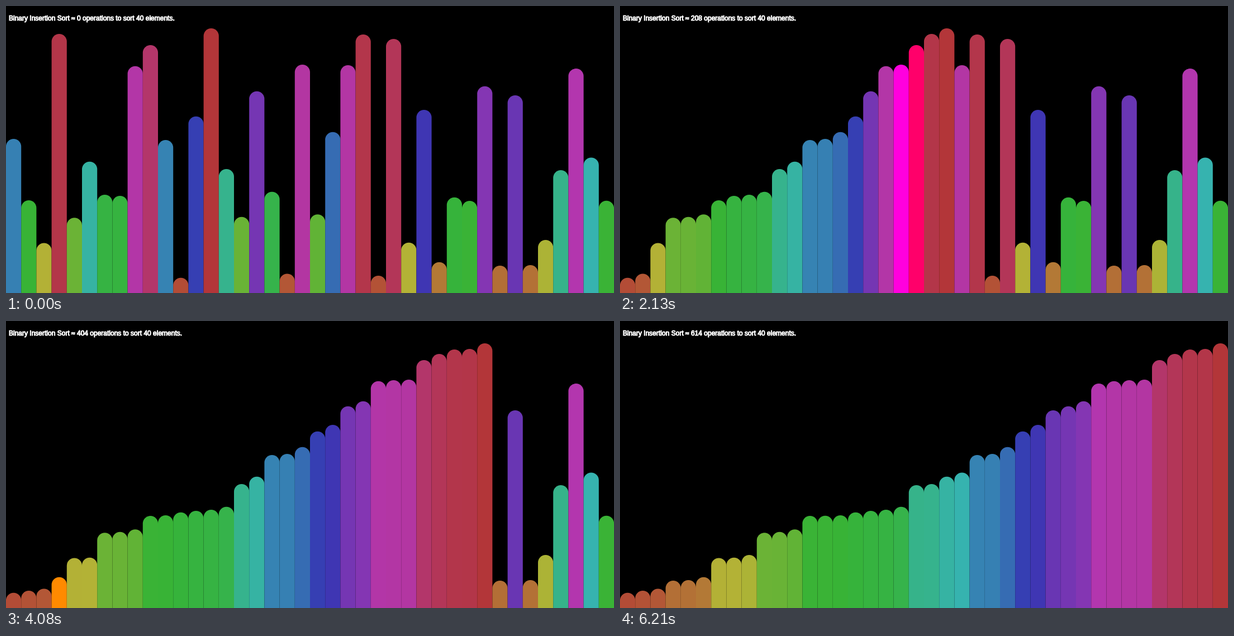
Write an HTML page that moves like this. It is 1088x514 px and loops after 9 s.

```html
<!DOCTYPE html>
<html lang="en">
<head>
<meta charset="utf-8">
<title>Binary Insertion Sort</title>
<style>
  html, body { margin: 0; width: 100%; height: 100%; overflow: hidden; background: #000; }
  svg { display: block; width: 1088px; height: 514px; }
  text { font: 12px "Liberation Sans", Arial, sans-serif; fill: #fff; stroke: #fff; stroke-width: 1; stroke-miterlimit: 10; }
</style>
</head>
<body>
<svg id="stage" viewBox="0 0 1088 514">
  <rect width="1088" height="514" fill="#000"/>
  <g id="bars"></g>
  <text id="label" x="5" y="26"></text>
</svg>
<script>
const W = 1088, H = 514, LOOP = 9000, STEP = 30, LAST = 207;
// top edge of each bar, in unsorted order
const tops = [
  238, 348, 424.5, 50, 379.3, 278.7, 338, 340, 107.7, 70,
  240, 486.7, 197.7, 40, 292, 377.7, 152.7, 332.7, 479.5, 105,
  373.3, 225.7, 106, 51, 483, 59, 423.7, 186, 458.7, 342.7,
  349, 143.7, 465, 160, 464, 419, 294, 112, 271.5, 348.8
];
const count = tops.length, barW = W / count;
const values = tops.map(top => H - top - barW / 2);

// One snapshot per counted operation: bar values and highlighted indexes.
function record(input) {
  const a = input.slice(), states = [];
  const snap = (...lit) => states.push({ a: a.slice(), lit });
  let lo = 0;
  for (let i = 1; i < a.length; i++) {
    const x = a[i];
    let hi = i;
    lo = 0;
    while (lo < hi) {
      snap(lo, hi);
      const mid = (lo + hi) >> 1;
      if (x < a[mid]) hi = mid; else lo = mid + 1;
    }
    snap(lo);
    for (let j = i; j > lo; j--) {
      snap(j);
      a[j] = a[j - 1];
    }
    a[lo] = x;
  }
  snap(lo);
  return states;
}

const states = record(values);
const total = states.length - 1;
const group = document.getElementById("bars");
const label = document.getElementById("label");

const bars = values.map((_, i) => {
  const line = document.createElementNS("http://www.w3.org/2000/svg", "path");
  line.setAttribute("stroke-width", barW);
  line.setAttribute("stroke-linecap", "round");
  line.dataset.x = (i + 0.5) * barW;
  return group.appendChild(line);
});

function color(v, lit) {
  const hue = v / (H * 0.9) * 360;
  return lit ? `hsl(${hue}, 100%, 50%)` : `hsl(${hue}, 53.85%, 45.5%)`;
}

function draw(tick) {
  const ops = Math.max(0, Math.min(total, Math.floor(3.0068 * tick - 4.6)));
  const { a, lit } = states[ops];
  const active = tick > 0 && tick < LAST;
  bars.forEach((bar, i) => {
    bar.setAttribute("d", `M${bar.dataset.x} ${H}V${H - a[i]}`);
    bar.setAttribute("stroke", color(a[i], active && lit.includes(i)));
  });
  label.textContent = `Binary Insertion Sort ≈ ${ops} operations to sort ${count} elements.`;
}

const start = performance.now();
let shown = -1;
function frame() {
  const t = (performance.now() - start) % LOOP;
  const tick = Math.min(LAST, Math.floor(t / STEP + 1e-6));
  if (tick !== shown) draw(shown = tick);
  requestAnimationFrame(frame);
}
frame();
</script>
</body>
</html>
```
